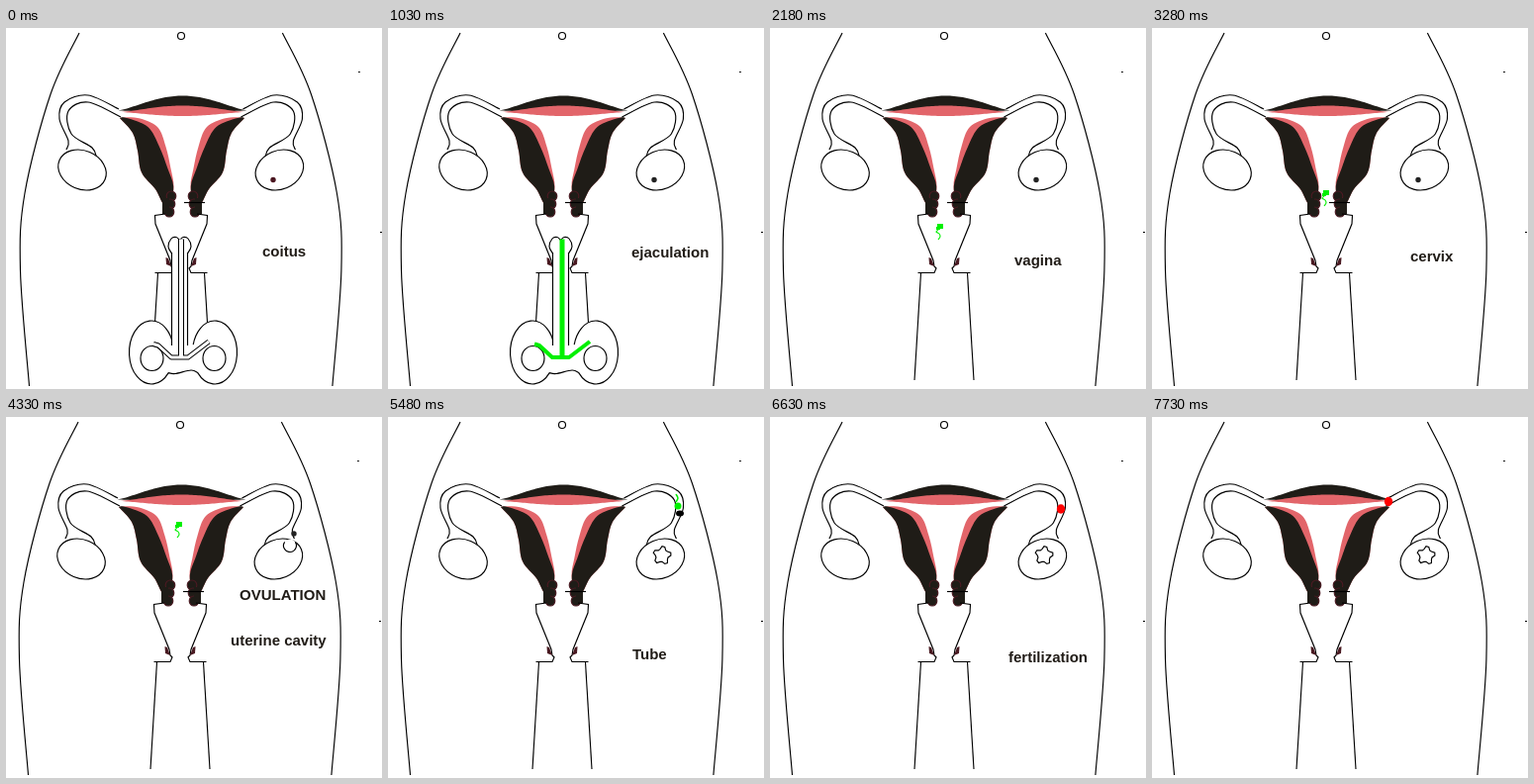
Animation, 380 px wide and 365 px high, one loop 8 s. Source, as an HTML page with a canvas:

```html
<!DOCTYPE html>
<html lang="en">
<head>
<meta charset="utf-8">
<title>Reproduction diagram</title>
<style>
html, body { margin: 0; width: 100%; height: 100%; overflow: hidden; background: #fff; }
canvas { display: block; }
</style>
</head>
<body>
<canvas id="stage" width="380" height="365"></canvas>
<script>
const ctx = document.getElementById('stage').getContext('2d');
const LOOP = 8000, TAU = Math.PI * 2;
const INK = '#000', WHITE = '#fff', WALL = '#1f1c17', PINK = '#e2656a', MAROON = '#4a1a22';
const GREEN = '#00f000', RED = '#ff0000';

// Smooth path through x, y pairs
function spline(...p) {
  const last = p.length / 2 - 1;
  const at = i => {
    const k = 2 * Math.max(0, Math.min(last, i));
    return [p[k], p[k + 1]];
  };
  ctx.beginPath();
  ctx.moveTo(p[0], p[1]);
  for (let i = 0; i < last; i++) {
    const [a, b, c, d] = [at(i - 1), at(i), at(i + 1), at(i + 2)];
    ctx.bezierCurveTo(b[0] + (c[0] - a[0]) / 6, b[1] + (c[1] - a[1]) / 6,
      c[0] - (d[0] - b[0]) / 6, c[1] - (d[1] - b[1]) / 6, c[0], c[1]);
  }
}

function poly(...p) {
  ctx.beginPath();
  for (let i = 0; i < p.length; i += 2) ctx.lineTo(p[i], p[i + 1]);
}

function paint(fill, stroke, width = 1.15) {
  if (fill) { ctx.fillStyle = fill; ctx.fill(); }
  if (stroke) { ctx.strokeStyle = stroke; ctx.lineWidth = width; ctx.stroke(); }
}

const curve = (...p) => { spline(...p); paint(null, INK); };
const line = (...p) => { poly(...p); paint(null, INK); };

function oval(x, y, rx, ry, fill, stroke, turn = 0, from = 0, to = TAU) {
  ctx.beginPath();
  ctx.ellipse(x, y, rx, ry, turn, from, to);
  paint(fill, stroke);
}

function label(str, x, y) {
  ctx.font = 'bold 15px "Liberation Sans", Arial, sans-serif';
  ctx.fillStyle = '#211c17';
  ctx.fillText(str, x, y);
}

// Draws the left half, then its reflection about x = axis
function mirrored(axis, draw) {
  draw();
  ctx.save();
  ctx.translate(2 * axis, 0);
  ctx.scale(-1, 1);
  draw();
  ctx.restore();
}

function outline() {
  curve(73, 5, 44, 67, 18, 167, 13.5, 245, 22.5, 362);
  // tube, outer and inner side
  curve(113, 82, 82, 68, 58, 75, 53, 92, 62, 114, 60, 123);
  curve(115, 90, 82, 75, 62, 84, 65, 107, 86, 121, 90.5, 131);
  oval(76, 143.5, 25, 19.5, WHITE, INK, .4);
}

// Lens with bell-shaped edges above and below a base line
function lens(half, base, up, down, color) {
  const edge = (side, height) => {
    for (let i = -30; i <= 30; i++) {
      const s = i / 30 * side;
      const bell = Math.max(0, Math.cos(s * Math.PI / 2)) ** 1.25;
      ctx.lineTo(177.5 + half * s, base - height * bell);
    }
  };
  ctx.beginPath();
  edge(1, up);
  edge(-1, -down);
  paint(color);
}

// Uterine wall; the lining takes up the given share along the cavity
function wall(lining, color) {
  const cavity = [168.5, 160, 165.5, 142, 160.5, 120, 152, 100, 132, 91];
  const inner = cavity.map((v, i) => i % 2 ? v : v - lining * (162 - cavity[i + 1]));
  spline(114, 91, 127, 106, 132, 124, 136, 146, 150, 163, 158, 178, 165, 178, ...inner, 114, 91);
  paint(color);
}

function uterus() {
  lens(65, 83.5, 15, 2, WALL);
  lens(62, 85, 6.5, 4, PINK);
  mirrored(177, () => {
    wall(0, PINK);
    wall(.155, WALL);
    for (let i = 0; i < 3; i++) oval(166 - i, 170 + 8 * i, 4.8, 5, WALL, MAROON);
    ctx.fillStyle = WALL;
    ctx.fillRect(157, 172, 7, 16);
  });
  line(179, 176.5, 200, 176.5);
}

function vagina() {
  line(160, 188, 149.5, 189.5, 150, 198, 165, 235, 166, 241, 168, 243, 166, 247.5, 149.5, 247.5);
  poly(160.5, 232, 163, 233, 166, 241, 161, 239);
  paint(MAROON);
  line(152.5, 248, 146, 356);
}

function corpusLuteum() {
  ctx.beginPath();
  for (let i = 0; i < 20; i++) {
    const a = i / 20 * TAU;
    const r = 7.8 + 1.8 * Math.sin(5 * a + 2.5);
    ctx.lineTo(277 + r * Math.cos(a), 140 + r * Math.sin(a));
  }
  ctx.closePath();
  paint(WHITE, INK);
}

function ovulation() {
  oval(287, 130, 6.5, 6.5, WHITE);
  oval(287, 130, 6.5, 6.5, null, INK, 0, -.6, Math.PI + .6);
  oval(291, 118, 2.7, 2.7, '#222');
}

function penis() {
  mirrored(178, () => {
    oval(146, 328, 22.5, 32, WHITE);
    oval(146, 328, 22.5, 32, null, INK, 0, .7, TAU - .25);
    oval(146.5, 334, 11.5, 12.5, WHITE, INK);
  });
  curve(163, 348.6, 170, 349.5, 186, 346, 193, 348.6);
  ctx.fillStyle = WHITE;
  ctx.fillRect(166, 225, 17, 110);
  mirrored(174.5, () => {
    spline(166.5, 228, 163, 221, 166, 213, 171, 211.5, 174.5, 214.5, 174.5, 228);
    paint(WHITE);
    curve(166.5, 228, 163, 221, 166, 213, 171, 211.5, 174.5, 214.5);
    line(166.5, 227, 166.5, 321);
  });
}

function ducts(color, width) {
  ctx.lineJoin = 'round';
  poly(148, 319.5, 153, 321, 166, 333, 183, 333, 204, 317);
  paint(null, color, width - 1);
  poly(176, 213.5, 176, 334);
  paint(null, color, width);
  ctx.lineJoin = 'miter';
}

function emptyDucts() {
  ducts(INK, 6);
  ducts(WHITE, 4);
}

function sperm(x, y) {
  ctx.fillStyle = GREEN;
  ctx.fillRect(x - 3, y - 3, 6, 5);
  ctx.fillRect(x - 4, y, 4, 3);
  spline(x - 2, y + 3, x - 4, y + 5, x - 1, y + 7, x, y + 10, x - 2, y + 13);
  paint(null, GREEN);
}

function meeting() {
  spline(291, 78, 293, 82, 291, 86);
  paint(null, GREEN, 1.5);
  oval(293, 90, 3.5, 3.5, GREEN);
  oval(295, 97.5, 4, 3, INK);
}

function zygote(x, y) {
  corpusLuteum();
  oval(x, y, 4.2, 4.7, RED);
}

const egg = color => oval(269, 153.5, 2.7, 2.7, color);

const scenes = [
  { start: 0, shift: 1, draw() { penis(); emptyDucts(); egg('#4a1620'); label('coitus', 258, 231); } },
  { start: 1030, draw() { penis(); ducts(GREEN, 5); egg('#222'); label('ejaculation', 246, 232); } },
  { start: 2180, draw() { sperm(172, 201); egg('#222'); label('vagina', 247, 240); } },
  { start: 3280, draw() { sperm(176, 167); egg('#222'); label('cervix', 261, 236); } },
  { start: 4330, draw() { sperm(175, 109); ovulation(); label('OVULATION', 236, 185); label('uterine cavity', 227, 231); } },
  { start: 5480, draw() { meeting(); corpusLuteum(); label('Tube', 247, 245); } },
  { start: 6630, draw() { zygote(294, 93); label('fertilization', 241, 248); } },
  { start: 7730, draw() { zygote(239, 85.5); } }
];

function render(time) {
  const t = time % LOOP;
  const scene = scenes.filter(s => s.start <= t).pop();
  ctx.fillStyle = WHITE;
  ctx.fillRect(0, 0, 380, 365);
  ctx.save();
  ctx.translate(scene.shift || 0, 0);
  mirrored(175.7, outline);
  oval(176, 8, 3.5, 3.5, null, INK);
  ctx.fillStyle = INK;
  ctx.fillRect(355, 44, 2, 1);
  ctx.fillRect(377, 206, 2, 1);
  uterus();
  mirrored(176, vagina);
  scene.draw();
  ctx.restore();
}

const begin = performance.now();
function tick() {
  render(performance.now() - begin);
  requestAnimationFrame(tick);
}
tick();
</script>
</body>
</html>
```
